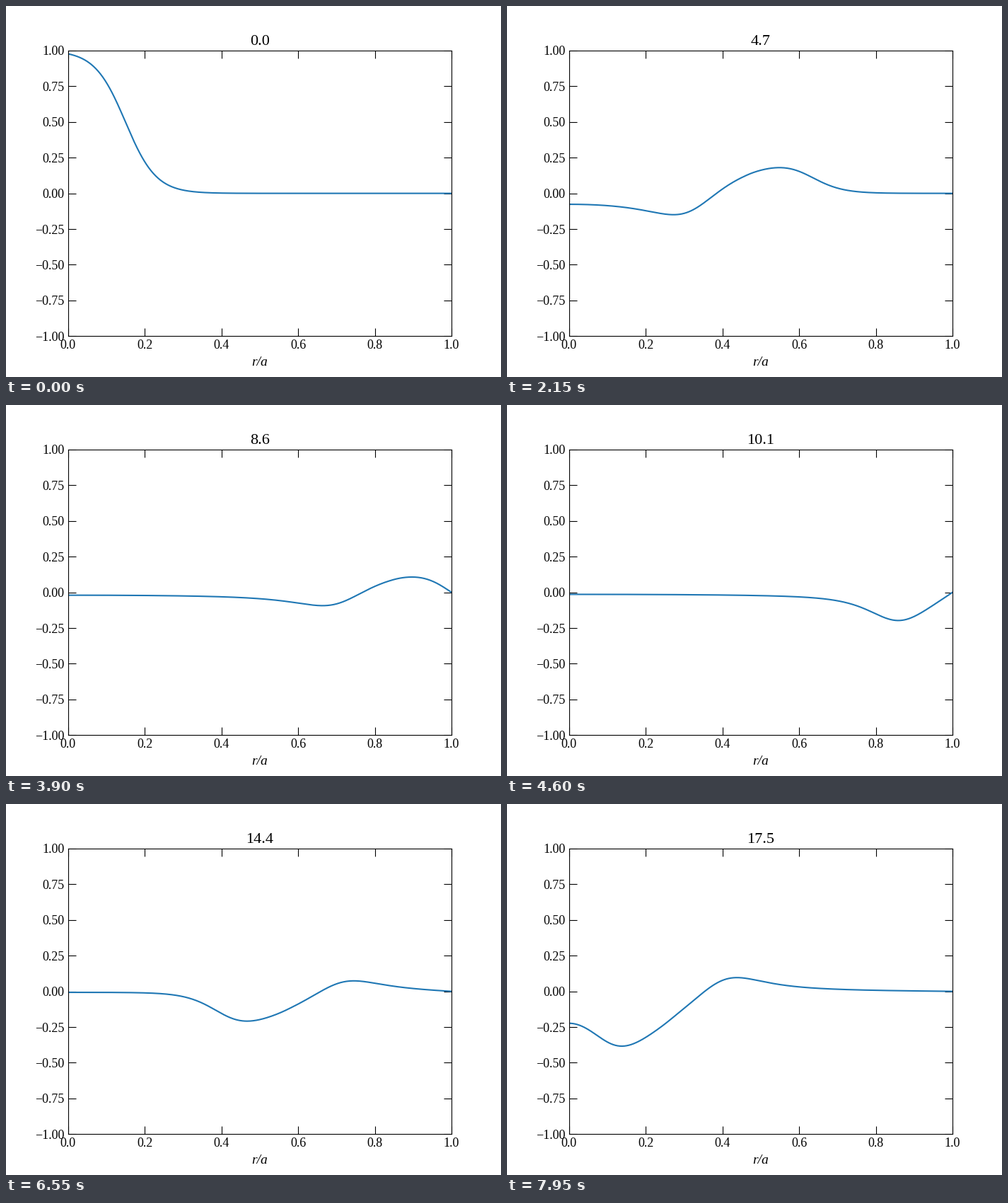
A matplotlib script for the animation above (8000 ms loop, 700x524 px).

```python
import numpy as np
import matplotlib.pyplot as plt
from matplotlib.animation import FuncAnimation

plt.rcParams.update({
    "font.family": "Liberation Serif",
    "xtick.direction": "in", "ytick.direction": "in",
    "xtick.top": True, "ytick.right": True,
    "xtick.major.size": 8, "ytick.major.size": 8,
    "xtick.labelsize": 13, "ytick.labelsize": 13,
})

FRAMES, INTERVAL = 160, 50
DT = 0.11       # model time per frame
SPEED = 0.1     # wave speed in radii per unit time
CELLS = 500


def radial_modes(n):
    """Cell centres, frequencies and modes of a disc with a fixed rim."""
    h = 1 / n
    r = (np.arange(n) + 0.5) * h
    face = np.arange(n + 1) * h
    diag = face[:-1] + face[1:]
    diag[-1] = face[-2] + 2 * face[-1]
    root = np.sqrt(r)
    off = -face[1:-1] / (root[:-1] * root[1:])
    mat = (np.diag(diag / r) + np.diag(off, 1) + np.diag(off, -1)) / h**2
    lam, vec = np.linalg.eigh(mat)
    return r, np.sqrt(np.maximum(lam, 0)), vec


r, omega, modes = radial_modes(CELLS)
start = 0.5 * (1 - np.tanh((r - 0.15) / 0.08))
coef = modes.T @ (start * np.sqrt(r))


def wave(t):
    u = modes @ (coef * np.cos(SPEED * omega * t)) / np.sqrt(r)
    return np.concatenate(([u[0]], u, [0]))


fig, ax = plt.subplots(figsize=(7, 5.24), dpi=100)
ax.set(xlim=(0, 1), ylim=(-1, 1),
       xticks=np.linspace(0, 1, 6), yticks=np.linspace(-1, 1, 9))
fig.text(358.5 / 700, 1 - 508 / 524, "r/a", style="italic", size=14,
         ha="center", va="baseline")
title = ax.set_title("0.0", fontsize=16)
line, = ax.plot(np.concatenate(([0], r, [1])), wave(0), color="#1f77b4", lw=1.5)


def update(i):
    t = DT * i
    line.set_ydata(wave(t))
    title.set_text(f"{t:.1f}")
    return line, title


anim = FuncAnimation(fig, update, frames=FRAMES, interval=INTERVAL,
                     repeat=True, repeat_delay=0)
plt.show()
```
